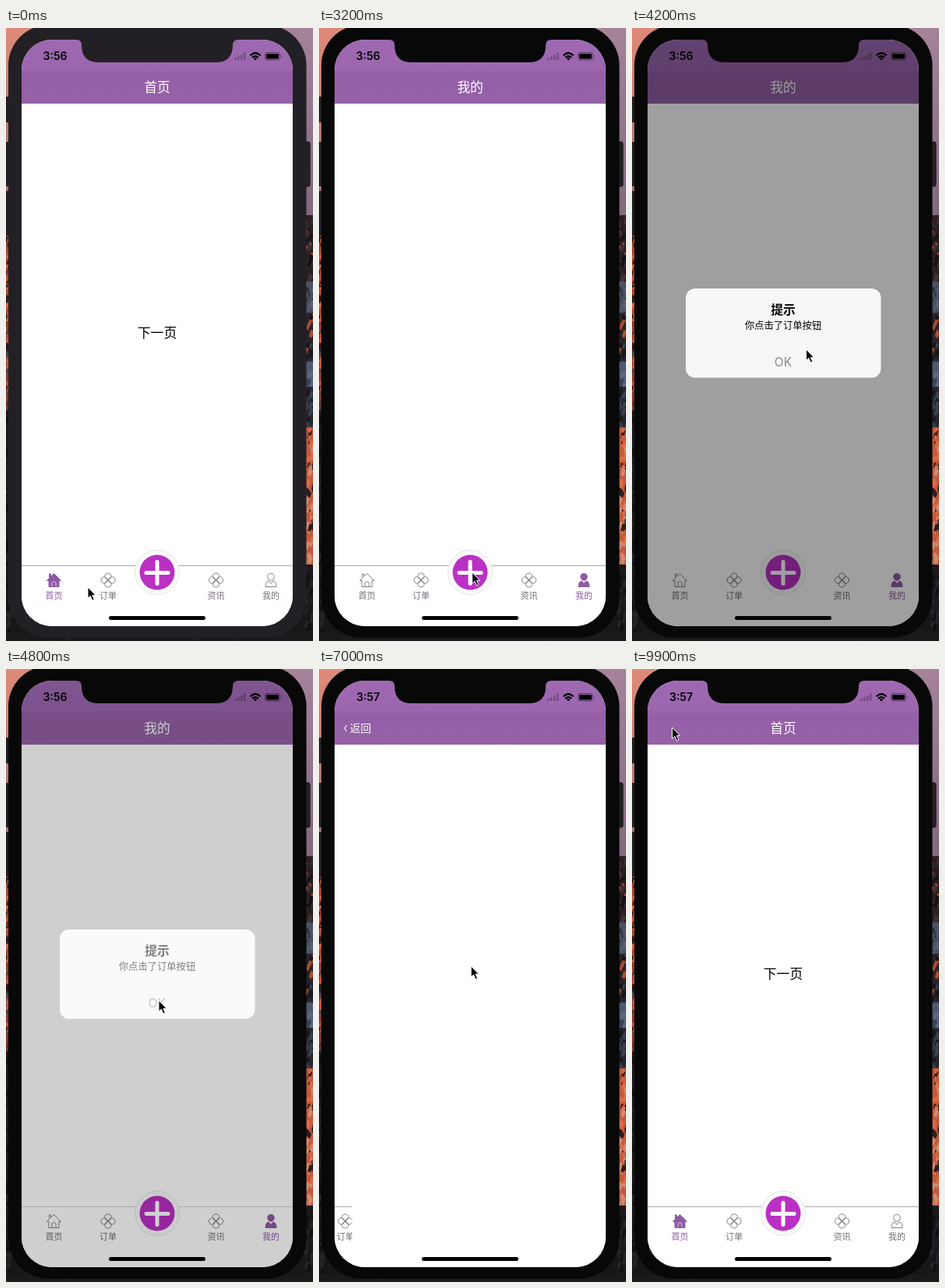
These frames come from a looping animation (394 by 786 pixels, 10 s). An HTML page:

```html
<!DOCTYPE html>
<html lang="zh-CN">
<head>
<meta charset="utf-8">
<style>
html, body { margin: 0; width: 100%; height: 100%; overflow: hidden; background: #181617; }
svg { display: block; }
text { font-family: "Noto Sans CJK SC", "Noto Sans CJK", sans-serif; text-anchor: middle; }
.latin { font-family: Inter, Roboto, sans-serif; }
.tab { font-size: 11px; fill: #756c77; }
.tab .icon { fill: none; stroke: #858085; stroke-width: 1; stroke-linejoin: round; }
.tab .line { fill: none; }
.tab.on { fill: #8f5ba3; }
.tab.on .icon { fill: #8f5ba3; stroke: #8f5ba3; }
.tab.on .line { fill: none; stroke: #d9c6e0; }
</style>
</head>
<body>
<svg width="394" height="786" viewBox="0 0 394 786">
  <defs>
    <clipPath id="screen"><rect x="20" y="15" width="348" height="752" rx="39"/></clipPath>
    <linearGradient id="sky" x2="1">
      <stop offset="0" stop-color="#e08a78"/><stop offset="1" stop-color="#a3839b"/>
    </linearGradient>
    <linearGradient id="dusk" x2="0" y2="1">
      <stop offset="0" stop-color="#6d5868" stop-opacity="0"/><stop offset="1" stop-color="#6d5868"/>
    </linearGradient>
    <linearGradient id="purple" x2="0" y2="1">
      <stop offset="0" stop-color="#9f69b2"/><stop offset=".45" stop-color="#9b66ae"/>
      <stop offset=".55" stop-color="#945fa7"/><stop offset="1" stop-color="#9562a7"/>
    </linearGradient>
  </defs>

  <rect width="394" height="300" fill="url(#sky)"/>
  <rect width="394" height="260" fill="url(#dusk)" opacity=".65"/>
  <g id="rocks"></g>

  <path d="M0 88h4v33H0zM0 146h4v57H0zM0 209h4v57H0z" fill="#222022"/>
  <rect x="380" y="146" width="10" height="57" rx="2" fill="#242224" stroke="#111"/>
  <rect id="bezel" x="3" y="-4" width="382.500" height="786" rx="52"/>

  <g clip-path="url(#screen)">
    <rect x="20" y="15" width="348" height="752" fill="#fff"/>
    <g id="home">
      <rect x="20" y="97" width="348" height="670" fill="#fff"/>
      <text id="next" x="194" y="397" font-size="16.800">下一页</text>
      <path id="rule" d="M20 689.500H368" stroke="#aaa8aa"/>
      <g id="tabs"></g>
      <circle cx="194" cy="698" r="28.500" fill="#fafafa" stroke="#e6e4e6"/>
      <circle cx="194" cy="698" r="22.500" fill="#ba30c4"/>
      <path d="M180 698.500H208M194 684.500V712.500" stroke="#fff" stroke-width="5" stroke-linecap="round"/>
    </g>
    <rect id="page" x="20" y="97" width="348" height="670" fill="#fff"/>

    <rect x="20" y="15" width="348" height="82" fill="url(#purple)"/>
    <text id="title" y="82" font-size="16.800" fill="#fff"></text>
    <g id="back" fill="#fff">
      <path d="M31.500 72L29 76L31.500 80" fill="none" stroke="#fff" stroke-width="1.200"/>
      <text x="49.500" y="81" font-size="13.800">返回</text>
    </g>

    <text id="clock" class="latin" x="63" y="41" font-size="14" font-weight="600"></text>
    <path d="M293 38h2.600v3H293zM297 36h2.600v5H297zM301 34h2.600v7H301zM305 31h2.600v10H305z" fill="#000" opacity=".25"/>
    <g fill="none" stroke="#000" stroke-width="2.200">
      <path d="M313.500 35.200Q320 28.800 326.500 35.200M316 38Q320 34.300 324 38"/>
    </g>
    <path d="M320 41.500L317.800 39.200Q320 37.400 322.200 39.200Z"/>
    <rect x="332.500" y="31.500" width="19" height="9.500" rx="2.500" fill="none" stroke="#000" stroke-opacity=".45"/>
    <rect x="334" y="33" width="16" height="6.500" rx="1.200"/>
    <path d="M353 34.500q1.600 1.700 0 3.500z" opacity=".5"/>
    <rect x="132" y="754" width="124" height="5" rx="2.500"/>

    <g id="modal">
      <rect x="20" y="15" width="348" height="752" opacity=".376"/>
      <g id="alert">
        <rect x="69" y="334" width="250.500" height="114.500" rx="12" fill="#f6f6f6"/>
        <text x="194" y="367" font-size="15.800" font-weight="700">提示</text>
        <text x="194" y="385.500" font-size="12.300">你点击了订单按钮</text>
        <text class="latin" x="194" y="434" font-size="15.500" fill="#8a8a8a">OK</text>
      </g>
    </g>
  </g>
  <path id="notch" d="M90 14V15Q97 15 97 22Q97 44 119 44H269Q291 44 291 22Q291 15 298 15V14Z"/>

  <path id="cursor" d="M0 0V14.200L3.300 11.200L5.800 17L8.300 15.900L5.800 10.300H10Z"
        stroke="#fff" stroke-width="1" stroke-linejoin="round"/>
</svg>

<script>
const $ = id => document.getElementById(id);
const clamp = v => Math.max(0, Math.min(1, v));
const smooth = v => v * v * (3 - 2 * v);
const easeOut = v => 1 - (1 - v) ** 3;
const ramp = (t, start, length) => clamp((t - start) / length);

// Rocky backdrop: y, height, base colour, fleck colours
let seed = 7;
const rnd = () => (seed = seed * 16807 % 2147483647) / 2147483647;
function strip(x, w, bands) {
  let out = "";
  for (const [y, h, base, ...flecks] of bands) {
    out += `<rect x="${x}" y="${y}" width="${w}" height="${h}" fill="${base}"/>`;
    for (let i = 0; i < h / 3; i++) {
      const px = x + rnd() * w, py = y + rnd() * h, s = 2 + rnd() * 5;
      const fill = flecks[Math.floor(rnd() * flecks.length)];
      out += `<path d="M${px} ${py}l${s * .6} ${s * .5}l${-s * .5} ${s * 1.3}l${-s * .5} ${-s * .4}z" fill="${fill}"/>`;
    }
  }
  return out;
}
$("rocks").innerHTML =
  strip(0, 5, [
    [266, 110, "#a9472f", "#2a1c1e", "#e2683f"],
    [376, 114, "#8a3b2c", "#241a1d", "#cf5a38", "#4a414d"],
    [490, 296, "#1b191b", "#252326", "#101011"]]) +
  strip(384, 10, [
    [240, 85, "#2a1f21", "#151214", "#b24d32", "#3c3036"],
    [325, 40, "#485062", "#2b2d37", "#596074"],
    [365, 63, "#29242a", "#b04c32", "#17161a", "#3d4352"],
    [428, 32, "#4c5970", "#3a4355", "#5c687f"],
    [460, 52, "#27262d", "#17171a", "#3b4150"],
    [512, 176, "#c25a3c", "#2b1d1f", "#de6b43", "#cf8c74"],
    [688, 98, "#1b191b", "#282528", "#101011"]]) +
  strip(0, 394, [[776, 10, "#1b191b", "#282528"]]);

// Tab icons are drawn around their own centre
const clover = `<path class="icon" d="M0 0C-6-3-5-9 0-9S6-3 0 0C3-6 9-5 9 0S3 6 0 0C6 3 5 9 0 9S-6 3 0 0C-3 6-9 5-9 0S-3-6 0 0Z"/>
  <path class="icon line" d="M-3-3L3 3M3-3L-3 3"/>`;
const house = `<path class="icon" d="M-9 .500L-6 -2.500V-8H-4V-4.500L0-8.500L9 .500H6.500V8.500H-6.500V.500Z"/>
  <path class="icon line" d="M-2.500 8V3Q0 0 2.500 3V8"/>`;
const person = `<path class="icon" d="M0-8.500C5-8.500 5-3.500 3-1Q0 2 -3-1C-5-3.500-5-8.500 0-8.500Z
  M-3 1Q-7 2-7 8.500H7Q7 2 3 1L0 4.500Z"/>`;
const tabs = [["首页", 61.5, house], ["订单", 131, clover], ["资讯", 269.5, clover], ["我的", 340, person]];
$("tabs").innerHTML = tabs.map(([name, x, icon]) =>
  `<g class="tab" transform="translate(${x} 708)">${icon}<text y="24">${name}</text></g>`).join("");

// Pointer stops: time, x, y
const stops = [
  [0, 105, 717], [300, 126, 711], [600, 126, 711], [1100, 253.5, 710], [1300, 266, 710],
  [1600, 266, 710], [2100, 337, 710], [2500, 337, 710], [3100, 196.5, 698], [3600, 196.5, 698],
  [4200, 223.5, 412], [4500, 196, 425], [4800, 196, 425], [5400, 60, 710], [5800, 60, 710],
  [6300, 198, 387], [6900, 198, 387], [8100, 51.5, 75], [10000, 51.5, 75]];
function pointer(t) {
  const i = stops.findIndex(s => s[0] > t);
  const [t0, x0, y0] = stops[i - 1], [t1, x1, y1] = stops[i];
  const k = smooth((t - t0) / (t1 - t0));
  return [x0 + (x1 - x0) * k, y0 + (y1 - y0) * k];
}

const shift = (id, x, y = 0) => $(id).setAttribute("transform", `translate(${x} ${y})`);

function draw(t) {
  const tab = t < 500 ? 0 : t < 1500 ? 1 : t < 2400 ? 2 : t < 5700 ? 3 : 0;
  const push = easeOut(ramp(t, 6700, 500)) - easeOut(ramp(t, 8700, 500));
  const enter = easeOut(ramp(t, 3500, 300)), leave = ramp(t, 4700, 200);
  const shown = enter * (1 - leave);

  $("bezel").setAttribute("fill", t < 500 ? "#222024" : "#080808");
  $("notch").setAttribute("fill", t < 500 ? "#222024" : "#080808");
  [...$("tabs").children].forEach((g, i) => g.classList.toggle("on", i === tab));
  $("next").style.display = tab ? "none" : "";
  $("rule").setAttribute("opacity", 1 - shown);
  $("clock").textContent = t < 5700 ? "3:56" : "3:57";

  $("title").textContent = tabs[tab][0];
  $("title").setAttribute("x", 194 - 120 * push);
  $("title").setAttribute("opacity", clamp(1 - push * 1.5));
  shift("home", -104 * push);
  shift("page", 348 * (1 - push));
  shift("back", 60 * (1 - push));
  $("back").setAttribute("opacity", push);

  const scale = 1.15 - .15 * enter;
  $("modal").setAttribute("opacity", shown);
  $("alert").setAttribute("transform", `translate(194 391) scale(${scale}) translate(-194 -391)`);
  shift("cursor", ...pointer(t));
}

function loop(now) {
  draw(Math.floor(now % 10000 / 100) * 100);
  requestAnimationFrame(loop);
}
draw(0);
requestAnimationFrame(loop);
</script>
</body>
</html>
```
